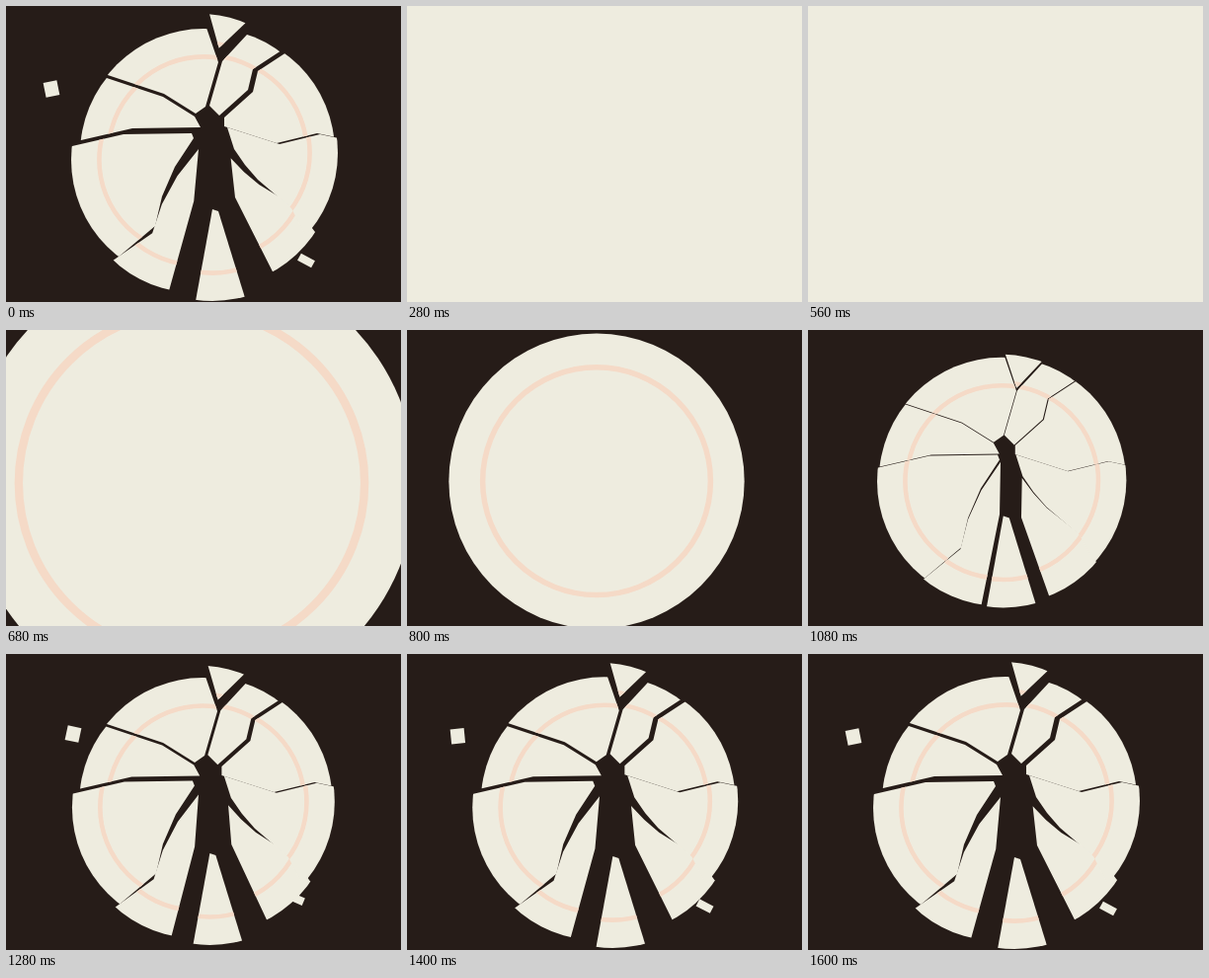
Write an HTML page with a canvas that moves like this. It is 400 px wide and 300 px high and loops after 2400 ms.

```html
<!DOCTYPE html>
<html lang="en">
<head>
<meta charset="utf-8">
<title>Shattering plate</title>
<style>
html, body { margin: 0; width: 100%; height: 100%; overflow: hidden; background: #261c18; }
canvas { display: block; width: 400px; height: 300px; }
</style>
</head>
<body>
<canvas id="stage" width="400" height="300"></canvas>
<script>
const ctx = document.getElementById("stage").getContext("2d");
const DARK = "#261c18", CREAM = "#eeecdf", ROSE = "#f5dac7";
const LOOP = 2400, STEP = 40;
const ZOOM = 520, IMPACT = 1040, REST = 1600;
const CX = 195, CY = 153, RADIUS = 124;

// Cracks run from the figure in the middle to the rim, counterclockwise.
// Each one opens a shard that reaches to the next crack and drifts away
// by (dx, dy) while turning about the inner end of its crack.
const shards = [];
function shard(dx, dy, turn, ...crack) {
  shards.push({ dx, dy, turn, crack });
}

shard(5, -6, 0, [197, 108], [210, 63], [198, 28]);
shard(4, -3, 0, [187, 115], [155, 95], [98, 76]);
shard(-5, 3, 0, [193, 126], [124, 127], [72, 139]);
shard(0, 14, 0.09, [195, 131], [176, 160], [163, 190], [156, 220], [118, 252]);
shard(14, 22, 0, [195, 184], [178, 277]);
shards.push({ missing: true, crack: [[201, 186], [229, 277]] });
shard(20, 5, -0.16, [212, 189], [240, 277]);
shard(17, -4, 0, [214, 149], [225, 165], [238, 180], [272, 209], [286, 236]);
shard(14, -5, 0, [207, 127], [260, 144], [301, 134], [320, 138]);
shard(9, -7, 0, [207, 118], [236, 92], [241, 71], [270, 52]);
shard(3, -21, 0.06, [197, 108], [210, 63], [235, 36]);

function plate(x, y, r) {
  ctx.fillStyle = CREAM;
  ctx.beginPath();
  ctx.arc(x, y, r, 0, 7);
  ctx.fill();
  ctx.strokeStyle = ROSE;
  ctx.lineWidth = r * 0.037;
  ctx.beginPath();
  ctx.arc(x, y, r * 0.771, 0, 7);
  ctx.stroke();
}

// Continues a crack well past the rim.
function extended(crack) {
  const [x, y] = crack[crack.length - 1];
  return [...crack, [2 * x - CX, 2 * y - CY]];
}

function drawShard({ dx, dy, turn, crack, missing }, next, p) {
  if (missing) return;
  const [px, py] = crack[0];
  ctx.save();
  ctx.translate(px + dx * p, py + dy * p);
  ctx.rotate(turn * p);
  ctx.translate(-px, -py);
  ctx.beginPath();
  for (const [x, y] of [...extended(crack), ...extended(next.crack).reverse()]) ctx.lineTo(x, y);
  ctx.clip();
  plate(CX, CY, RADIUS);
  ctx.restore();
}

function chip(x, y, angle, w, h) {
  ctx.save();
  ctx.translate(x, y);
  ctx.rotate(angle);
  ctx.fillStyle = CREAM;
  ctx.fillRect(-w / 2, -h / 2, w, h);
  ctx.restore();
}

function drawBroken(t) {
  const left = Math.max(0, (REST - t) / (REST - IMPACT));
  const p = 1 - left ** 3;
  chip(164 - 118 * p, 68 + 16 * p, 2 - 2.2 * p, 14, 15);
  chip(250 + 54 * p, 205 + 53 * p, 0.5 * p, 16, 8);
  shards.forEach((s, i) => drawShard(s, shards[(i + 1) % shards.length], p));
}

function drawZoom(t) {
  const left = (IMPACT - t) / (IMPACT - ZOOM);
  const r = 117 + 332 * left ** 3;
  plate(193.5 - (r - 121) * 0.052, 152.5 + (r - 121) * 0.024, r);
}

function render(now) {
  const t = Math.floor((now % LOOP) / STEP) * STEP;
  ctx.fillStyle = DARK;
  ctx.fillRect(0, 0, 400, 300);
  if (t < STEP) drawBroken(REST);
  else if (t <= IMPACT) drawZoom(Math.max(t, ZOOM));
  else drawBroken(t);
}

const start = performance.now();
function tick() {
  render(performance.now() - start);
  requestAnimationFrame(tick);
}
tick();
</script>
</body>
</html>
```
